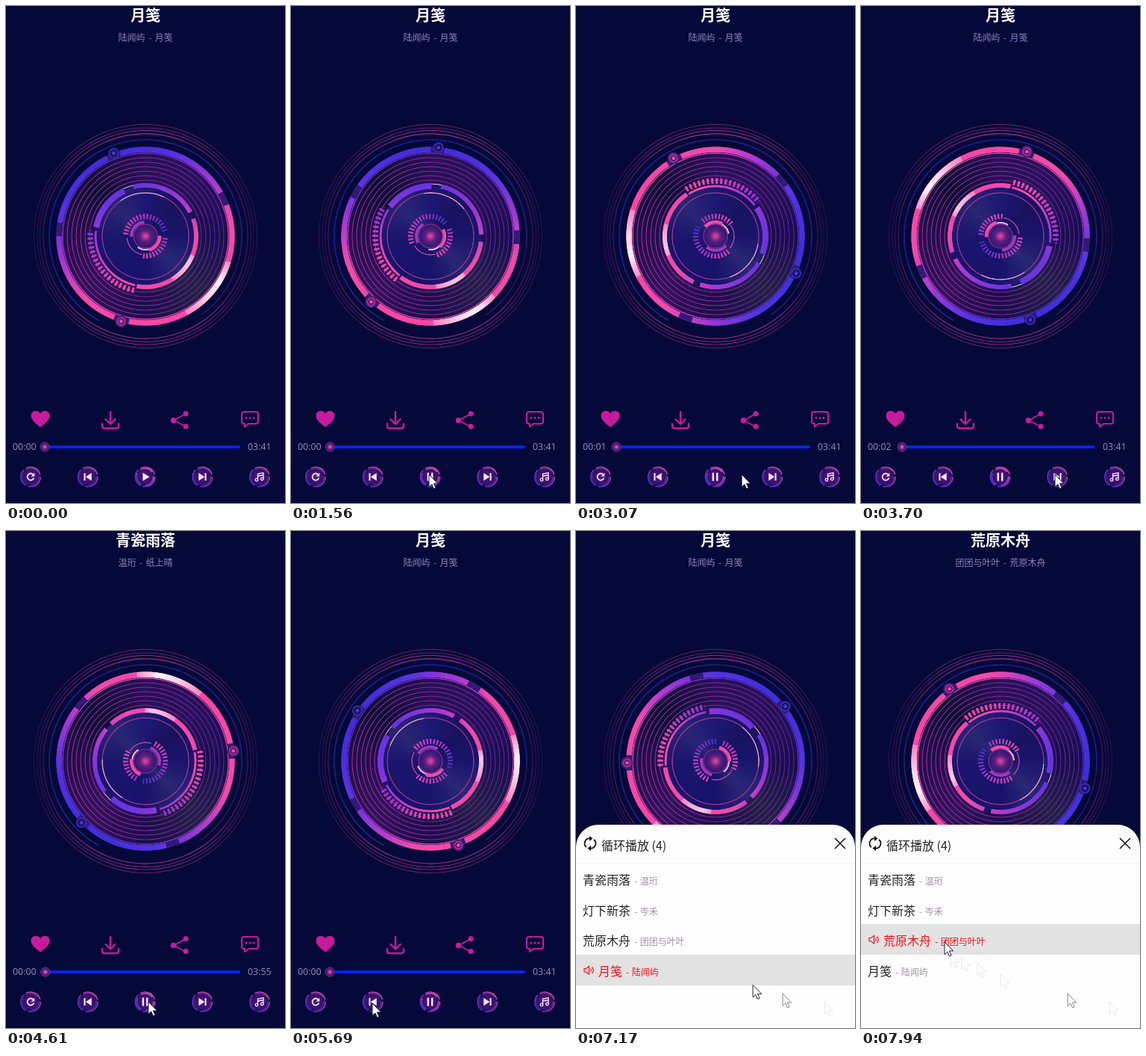
Animation of 374x665 px, one loop 8000 ms. Source, as an HTML page with a canvas:

```html
<!DOCTYPE html>
<html lang="zh-CN">
<head>
<meta charset="utf-8">
<title>Music player</title>
<style>
  html, body { margin: 0; width: 100%; height: 100%; overflow: hidden; background: #050939; }
  body { position: relative; font-family: "Noto Sans CJK SC", "Noto Sans CJK JP", "Noto Sans CJK", sans-serif; }
  #stage { position: absolute; left: 0; top: 0; width: 374px; height: 665px; overflow: hidden; }
  #stage > * { position: absolute; }
  .layer { left: 27px; top: 148px; width: 320px; height: 320px; }
  #title, #sub { left: 0; width: 374px; text-align: center; white-space: pre; }
  #title { top: -2px; font: bold 20px/28px "Noto Sans CJK SC", "Noto Sans CJK JP", sans-serif; color: #fff; }
  #sub { top: 32px; font-size: 12px; line-height: 20px; word-spacing: 1.7px; color: #9080c0; }
  .time { top: 581px; font: 12.4px/18px "Open Sans", "Noto Sans", sans-serif; color: #958cc6; }
  svg { left: 0; top: 0; }
  #panel { left: 0; top: 393px; width: 374px; height: 272px; background: #fefefe; border-radius: 30px 30px 0 0; overflow: hidden; }
  #head { height: 51px; border-bottom: 1px solid #f0f0f0; padding-left: 34px; font-size: 16px; line-height: 54px; color: #222; }
  .row { position: relative; box-sizing: border-box; height: 40.7px; padding-left: 9px; font-size: 16px; line-height: 42px; color: #222; white-space: nowrap; }
  .row span { margin-left: 5px; font-size: 12px; word-spacing: 1px; color: #9c929f; }
  .row svg { position: absolute; left: 10px; top: 14px; display: none; }
  .row.hover { background: #e2e2e2; }
  .row.active { padding-left: 30px; color: #f5101c; }
  .row.active span { color: #f5101c; }
  .row.active svg { display: block; }
  #panel > svg { position: absolute; }
</style>
</head>
<body>
<div id="stage">
  <div id="title"></div>
  <div id="sub"></div>
  <div class="time" id="now" style="left:9px"></div>
  <div class="time" id="total" style="left:324px"></div>

  <svg id="controls" width="374" height="665" viewBox="0 0 374 665">
    <defs>
      <linearGradient id="rim" x1="1" y1="0" x2="0" y2="1">
        <stop offset="0" stop-color="#ff55ae"/><stop offset=".5" stop-color="#a337cf"/><stop offset="1" stop-color="#4a31dd"/>
      </linearGradient>
      <radialGradient id="face">
        <stop offset="0" stop-color="#551a82"/><stop offset=".6" stop-color="#37146e"/><stop offset="1" stop-color="#1d105a"/>
      </radialGradient>
      <radialGradient id="bead">
        <stop offset="0" stop-color="#f864a8"/><stop offset=".3" stop-color="#c83a92"/><stop offset=".55" stop-color="#5c1f7c"/><stop offset="1" stop-color="#3c1868"/>
      </radialGradient>
    </defs>
    <g fill="none" stroke="#c81a9c" stroke-width="2.4" stroke-linecap="round" stroke-linejoin="round">
      <path fill="#c81a9c" stroke="none" d="M46 563.5C38 557.5 33.5 553 33.5 548.2 33.5 541 42 539.5 46 545.2 50 539.5 58.5 541 58.5 548.2 58.5 553 54 557.5 46 563.5Z"/>
      <path d="M140 543V559M133.5 553L140 559.5 146.5 553M129 559V562Q129 565 132 565H148Q151 565 151 562V559"/>
      <path stroke-width="1.7" d="M241 545.5L225 554.5 241 563"/>
      <g fill="#c81a9c" stroke="none">
        <circle cx="241" cy="545.5" r="3.5"/><circle cx="224.5" cy="554.5" r="3.8"/><circle cx="241" cy="562.5" r="3.5"/>
        <circle cx="322" cy="551" r="1.5"/><circle cx="327" cy="551" r="1.5"/><circle cx="332" cy="551" r="1.5"/>
      </g>
      <path stroke-width="2" d="M319 543H335Q338 543 338 546V556Q338 559 335 559H325L320 563V559H319Q316 559 316 556V546Q316 543 319 543Z"/>
    </g>
    <rect x="50" y="588" width="264" height="4" rx="2" fill="#0325ee"/>
    <circle id="knob" cy="590" r="6.2" fill="url(#bead)" stroke="#71358a" stroke-width=".8"/>
    <g id="buttons"></g>
  </svg>

  <div id="panel">
    <div id="head">循环播放 (4)</div>
    <svg width="374" height="51" fill="none" stroke="#111" stroke-width="1.8">
      <path d="M14 30A6.5 6.5 0 0 1 19 18.5M24 20A6.5 6.5 0 0 1 19 31.5"/>
      <path fill="#111" stroke="none" d="M18 15L22.5 18.5 18 22ZM20 28L15.5 31.5 20 35Z"/>
      <path stroke-width="1.5" d="M347 18L361 32M361 18L347 32"/>
    </svg>
  </div>
  <svg id="pointer" width="374" height="665" viewBox="0 0 374 665"></svg>
</div>

<script>
const LOOP = 8000, SPIN_START = 1200, SPIN_SPEED = 0.0725;
const $ = id => document.getElementById(id);
const stage = $('stage');

const songs = [
  { name: '青瓷雨落', artist: '温珩', album: '纸上晴', length: 235 },
  { name: '灯下新茶', artist: '岑禾', album: '灯下新茶', length: 228 },
  { name: '荒原木舟', artist: '团团与叶叶', album: '荒原木舟', length: 258 },
  { name: '月笺', artist: '陆闻屿', album: '月笺', length: 221 }
];

// switch time, song, moment its sound starts
const playlist = [[0, 3, 1200], [3950, 0, 3950], [5400, 3, 5600], [7820, 2, 7900]];

// time, x, y of the pointer tip
const pointerPath = [
  [440, 178, 652], [690, 185, 627], [2700, 185, 627], [3450, 260, 627], [4150, 260, 627],
  [4610, 191, 630], [5150, 109, 632], [5900, 109, 632], [6450, 333, 630], [6950, 333, 630],
  [7100, 277, 619], [7260, 187, 593], [7340, 156, 578], [7420, 135, 570], [7500, 120, 565], [7620, 112, 550]
];

// ---- disc: angles in degrees, clockwise from the top ----
const rad = deg => (deg - 90) * Math.PI / 180;
const point = (r, deg) => [r * Math.cos(rad(deg)), r * Math.sin(rad(deg))];

function layer(draw) {
  const canvas = document.createElement('canvas');
  canvas.width = canvas.height = 640;
  canvas.className = 'layer';
  const c = canvas.getContext('2d');
  c.scale(2, 2);
  c.translate(160, 160);
  draw(c);
  stage.insertBefore(canvas, $('controls'));
  return canvas;
}

function arc(c, r, from, to, width, style, dash = []) {
  c.beginPath();
  c.arc(0, 0, r, rad(from), rad(to));
  c.lineWidth = width;
  c.strokeStyle = style;
  c.setLineDash(dash);
  c.stroke();
}

function dot(c, [x, y], r, fill) {
  c.beginPath();
  c.arc(x, y, r, 0, 7);
  c.fillStyle = fill;
  c.fill();
}

function stops(gradient, list) {
  list.forEach(([at, color]) => gradient.addColorStop(at, color));
  return gradient;
}

const evenly = colors => colors.map((color, i) => [i / (colors.length - 1), color]);

layer(c => {
  // the outer circles fade towards both sides
  const halo = stops(c.createLinearGradient(-150, 0, 150, 0), evenly(
    ['rgba(190,45,140,.35)', 'rgba(215,55,155,.8)', 'rgba(225,60,160,.9)', 'rgba(215,55,155,.8)', 'rgba(190,45,140,.35)']));
  arc(c, 149.5, 0, 360, 0.6, halo);
  arc(c, 145, 0, 360, 0.6, halo);
  arc(c, 141.5, 0, 360, 0.7, halo);
  arc(c, 137, 0, 360, 0.9, halo);
  arc(c, 129, 242, 455, 1.8, '#3535c8', [1.3, 1.4]);
  arc(c, 129, 209, 242, 1, '#3436b8');
  arc(c, 129, 95, 145, 0.8, 'rgba(110,45,150,.7)');

  const vinyl = c.createConicGradient(rad(0), 0, 0);
  dot(c, [0, 0], 114, stops(vinyl, evenly(
    ['#2b1059', '#2a1058', '#1d0d4d', '#242143', '#1d0d4c', '#32125d', '#240e52', '#0d0f36', '#2b1059'])));
  const groove = stops(c.createLinearGradient(-110, 0, 110, 0), evenly(['#c83a98', '#9a35ae', '#5530bd']));
  for (let r = 75; r <= 111; r += 6) arc(c, r, 0, 360, 0.8, groove);

  const label = c.createConicGradient(rad(0), 0, 0);
  dot(c, [0, 0], 68, stops(label, evenly(
    ['#1d1873', '#18135f', '#1a156c', '#292775', '#17136b', '#19146c', '#1a166e', '#292674', '#1d1873'])));
});

const ring = layer(c => {
  const [x, y] = point(118, 152);
  const paint = stops(c.createLinearGradient(-x, -y, x, y),
    [[0, '#412eda'], [.16, '#5632e1'], [.42, '#aa39d2'], [.64, '#f14aab'], [1, '#f747a5']]);
  const shine = alpha => stops(c.createConicGradient(rad(105), 0, 0), [
    [0, `rgba(255,235,245,${alpha * .35})`], [.045, `rgba(255,250,253,${alpha})`],
    [.085, `rgba(255,240,248,${alpha * .85})`], [.13, `rgba(255,225,240,${alpha * .4})`],
    [1, `rgba(255,225,240,${alpha * .35})`]]);

  arc(c, 116, 0, 360, 7.5, paint);
  arc(c, 116, 107, 152, 7.5, shine(.95));
  arc(c, 111, 0, 360, 1, paint);
  for (const [from, to] of [[60, 69], [270, 279], [334, 343], [191, 201]]) arc(c, 116, from, to, 7.5, '#321979');

  const blue = point(119, -21), pink = point(118.5, 196);
  dot(c, blue, 7, '#3528b4');
  dot(c, blue, 4.8, '#15104f');
  dot(c, blue, 2.6, '#4135c8');
  dot(c, pink, 8, '#4b1c77');
  dot(c, pink, 5.8, '#a93092');
  dot(c, pink, 4, '#40176d');
  dot(c, pink, 2.4, '#ec4aa3');

  arc(c, 67, 280, 335, 8, paint);
  arc(c, 68, 346, 422, 6, paint);
  arc(c, 68, 70, 190, 6, paint);
  arc(c, 68, 112, 148, 6, shine(.7));
  arc(c, 67, 192, 276, 3, paint);
  arc(c, 70, 335, 346, 1, '#f1c4e6');
  arc(c, 74, 192, 276, 7.5, paint, [3, 3]);
  arc(c, 58, 0, 360, 1.2, '#a9358f');
  arc(c, 58, 325, 385, 1.2, '#f0a3c8');
});

const core = layer(c => {
  const sweep = stops(c.createLinearGradient(-30, 0, 30, 0), evenly(['#dc3fae', '#a235c0', '#3a2cc2']));
  const warm = stops(c.createLinearGradient(-10, 30, 30, 0), evenly(['#ee4aaa', '#9a32b5']));
  arc(c, 26.5, 275, 435, 7, sweep, [2.3, 2.2]);
  arc(c, 26.5, 95, 187, 7, warm, [2.3, 2.2]);
  arc(c, 25, 190, 265, 1.2, '#d04aa8');
  const glow = stops(c.createRadialGradient(0, 0, 0, 0, 0, 17),
    [[0, '#e8479c'], [.2, '#b03494'], [.42, '#5d2080'], [.7, '#3f1b76'], [1, '#2a166e']]);
  dot(c, [0, 0], 17, glow);
  arc(c, 19, 88, 165, 4.5, '#f04aa8');
  arc(c, 18, 165, 215, 2, '#f6b1d8');
  arc(c, 19, 268, 355, 4, '#a138b9');
  arc(c, 16, 0, 360, 0.8, '#a33a9f');
});

// ---- buttons, list and pointer ----
const line = (d, w = 1.8) => `<path d="${d}" fill="none" stroke="#fbe3f5" stroke-width="${w}"/>`;
const solid = d => `<path d="${d}" fill="#fbe3f5"/>`;
const icons = [
  line('M3.5-3A4.5 4.5 0 1 0 4.4 1.5') + solid('M5.3-5.5V-.6H.5Z'),
  line('M-4.3-5V5', 2) + solid('M5-5.2V5.2L-3-0Z'),
  `<g id="play">${solid('M-3.2-5.5L5.8 0-3.2 5.5Z')}</g><g id="pause">${line('M-2.7-5.5V5.5M2.7-5.5V5.5', 2.4)}</g>`,
  line('M4.3-5V5', 2) + solid('M-5-5.2V5.2L3 0Z'),
  line('M-2.5 4V-4L5-5.5V2.5M-2.5-1L5-2.5', 1.3) +
    '<g fill="none" stroke="#fbe3f5" stroke-width="1.3"><circle cx="-4" cy="4" r="1.8"/><circle cx="3.4" cy="2.7" r="1.8"/></g>'
];
$('buttons').innerHTML = icons.map((icon, i) => `<g transform="translate(${33 + i * 76.75} 630)">
  <circle r="13.2" fill="url(#face)" stroke="url(#rim)" stroke-width="1.3" stroke-dasharray="24 3.6"/>
  <circle r="11.2" fill="none" stroke="url(#rim)" stroke-width="${i === 2 ? 1.6 : .6}" stroke-dasharray="17 6"/>${icon}</g>`).join('');

const speaker = `<svg width="15" height="14" fill="none" stroke="#f5101c" stroke-width="1.2">
  <path d="M1 4.5H3.5L7.5 1.5V12L3.5 9H1ZM9.5 4.5Q11 6.7 9.5 9M11.5 2.5Q15 6.7 11.5 11"/></svg>`;
const rows = songs.map(song => {
  const row = document.createElement('div');
  row.className = 'row';
  row.innerHTML = `${speaker}${song.name}<span>- ${song.artist}</span>`;
  $('panel').append(row);
  return row;
});

const arrow = '<path d="M0 0V16.5L3.8 12.9 6.4 18.9 9 17.8 6.4 11.9H11.7Z" fill="#fff" stroke="#0b0b2a" stroke-width=".9"/>';
const trailKeys = pointerPath.slice(9, 15);
$('pointer').innerHTML = trailKeys.map(([, x, y], i) =>
  `<g class="trail" opacity="${i === 1 ? .55 : .1}" transform="translate(${x} ${y})">${arrow}</g>`).join('') + `<g id="arrow">${arrow}</g>`;
const trail = [...document.querySelectorAll('.trail')];

// ---- playback ----
function pointerAt(t) {
  const next = pointerPath.findIndex(key => key[0] > t);
  if (next === 0) return null;
  if (next < 0) return pointerPath[pointerPath.length - 1].slice(1);
  const [t0, x0, y0] = pointerPath[next - 1], [t1, x1, y1] = pointerPath[next];
  const k = (t - t0) / (t1 - t0);
  return [x0 + (x1 - x0) * k, y0 + (y1 - y0) * k];
}

const clock = s => [s / 60, s % 60].map(n => String(Math.floor(n)).padStart(2, '0')).join(':');

function setText(id, text) {
  if ($(id).textContent !== text) $(id).textContent = text;
}

function render(t) {
  const [, index, soundStart] = playlist.filter(entry => entry[0] <= t).pop();
  const song = songs[index], seconds = Math.max(0, t - soundStart) / 1000;
  setText('title', song.name);
  setText('sub', `${song.artist} - ${song.album}`);
  setText('now', clock(seconds));
  setText('total', clock(song.length));
  $('knob').setAttribute('cx', 52 + 264 * seconds / song.length);

  const angle = Math.max(0, t - SPIN_START) * SPIN_SPEED;
  ring.style.transform = `rotate(${angle}deg)`;
  core.style.transform = `rotate(${-angle}deg)`;

  const playing = t >= 990;
  $('play').style.display = playing ? 'none' : '';
  $('pause').style.display = playing ? '' : 'none';

  const open = Math.min(1, Math.max(0, (t - 6620) / 280));
  $('panel').style.transform = `translateY(${272 * (1 - open) ** 2}px)`;
  $('panel').style.visibility = open ? 'visible' : 'hidden';

  const tip = pointerAt(t);
  $('arrow').style.display = tip ? '' : 'none';
  if (tip) $('arrow').setAttribute('transform', `translate(${tip[0]} ${tip[1]})`);
  const hovered = tip && open === 1 ? Math.floor((tip[1] - 445) / 40.7) : -1;
  rows.forEach((row, i) => {
    row.classList.toggle('hover', i === hovered);
    row.classList.toggle('active', i === index);
  });
  trail.forEach((ghost, i) => { ghost.style.display = t > trailKeys[i][0] + 60 ? '' : 'none'; });
}

const begin = performance.now();
function tick() {
  render((performance.now() - begin) % LOOP);
  requestAnimationFrame(tick);
}
tick();
</script>
</body>
</html>
```
